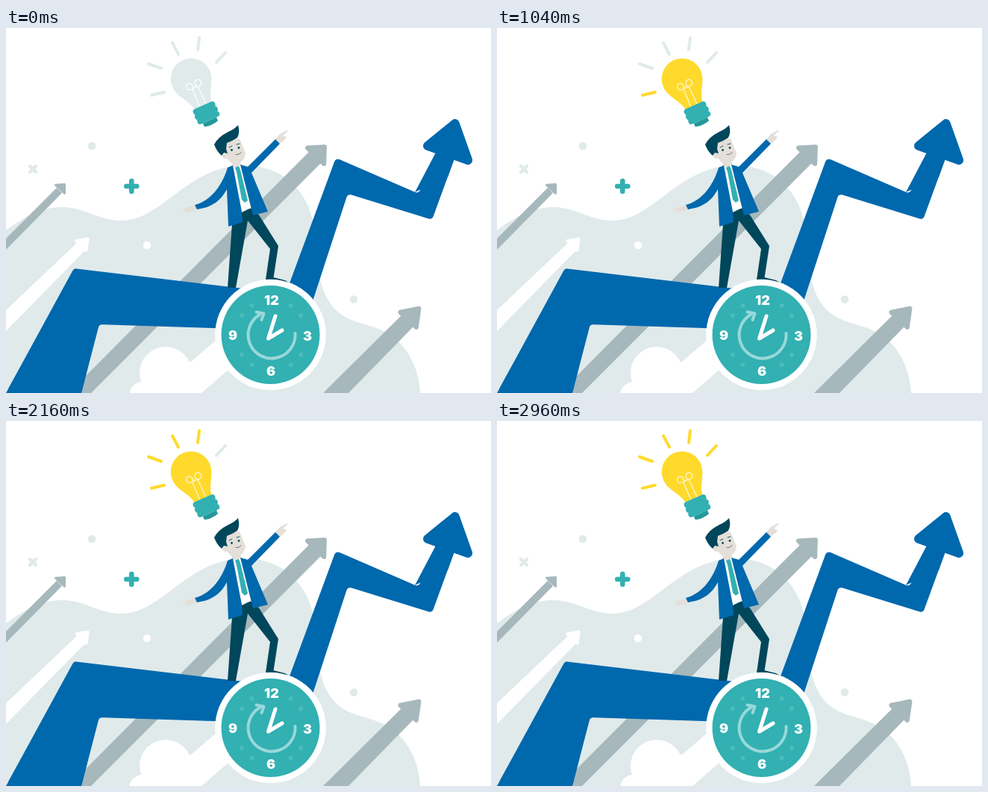
Recreate the animation shown at these times as an HTML page with a canvas. Size 650 by 489 pixels, loop 3000 ms.

```html
<!DOCTYPE html>
<html lang="en">
<head>
<meta charset="utf-8">
<title>Bright idea</title>
<style>
html, body { margin: 0; width: 100%; height: 100%; overflow: hidden; background: #fff; }
canvas { display: block; width: 650px; height: 489px; }
</style>
</head>
<body>
<canvas id="stage" width="650" height="489"></canvas>
<script>
const ctx = document.getElementById('stage').getContext('2d');
const W = 650, H = 489, LOOP = 3000;
const BULB_ON = 600, STEP = 360;
const PALE = '#e0eaea', GRAY = '#a6b8bc', BLUE = '#0068ad', NAVY = '#00475c',
      TEAL = '#32b0b2', YELLOW = '#ffda2c', SKIN = '#e4dfd8', WHITE = '#fff';

const RAYS = [
  [195, 90, 212, 86], [191, 48, 208, 54], [223, 20, 231, 35],
  [259, 13, 257, 29], [294, 33, 282, 46]
];

function shape(d, color) {
  ctx.fillStyle = color;
  ctx.fill(new Path2D(d));
}

function line(d, color, width) {
  ctx.strokeStyle = color;
  ctx.lineWidth = width;
  ctx.lineCap = ctx.lineJoin = 'round';
  ctx.stroke(new Path2D(d));
}

function dot(x, y, r, color) {
  ctx.fillStyle = color;
  ctx.beginPath();
  ctx.arc(x, y, r, 0, Math.PI * 2);
  ctx.fill();
}

// Polygon with softened corners
function poly(points, r, color) {
  const n = points.length, [ax, ay] = points[n - 1], [bx, by] = points[0];
  ctx.beginPath();
  ctx.moveTo((ax + bx) / 2, (ay + by) / 2);
  points.forEach(([x, y], i) => {
    const [nx, ny] = points[(i + 1) % n];
    ctx.arcTo(x, y, nx, ny, r);
  });
  ctx.closePath();
  ctx.fillStyle = color;
  ctx.fill();
}

function cross(x, y, arm, width, turn, color) {
  ctx.save();
  ctx.translate(x, y);
  ctx.rotate(turn);
  line(`M${-arm} 0H${arm}M0 ${-arm}V${arm}`, color, width);
  ctx.restore();
}

function drawBackdrop() {
  shape('M0 271C30 249 50 240 76 240C108 241 126 259 157 258C211 256 244 183 322 184' +
        'C374 185 405 222 412 262C418 300 414 340 436 371C459 402 496 391 526 420' +
        'C544 438 554 463 555 489H0Z', PALE);
  dot(214, 462, 35, WHITE);
  dot(183, 492, 18, WHITE);
  shape('M180 489L196 462L248 447L298 404L330 430L262 489Z', WHITE);

  shape('M0 282L68 214L75 221L0 297Z', GRAY);
  poly([[80, 208], [80, 225], [63, 209]], 1.5, GRAY);
  shape('M0 378L96 287L106 298L0 406Z', WHITE);
  poly([[112, 280], [109, 302], [90, 284]], 2, WHITE);
  shape('M84 489L406 166L422 181L114 489Z', GRAY);
  poly([[430, 156], [429, 189], [397, 158]], 3, GRAY);
  shape('M425 489L531 384L546 400L459 489Z', GRAY);
  poly([[557, 372], [552, 407], [522, 379]], 3, GRAY);

  dot(115, 158, 5.3, PALE);
  dot(189, 291, 5.2, WHITE);
  dot(466, 363.5, 5.3, PALE);
  cross(36, 189, 5.5, 4.6, Math.PI / 4, PALE);
  cross(168.3, 212, 7, 6.6, 0, TEAL);
}

function drawTrend() {
  poly([[0, 489], [91, 322], [318, 349], [374, 358], [442, 174], [553, 222],
        [578, 165], [602, 172], [571, 257], [458, 222], [410, 369],
        [340, 404], [125, 397], [101, 489], [50, 489]], 5, BLUE);
  shape('M0 489L20 453L110 453L101 489Z', BLUE);
  shape('M548 220L578 163L602 172L592 200Z', BLUE);
  poly([[604.5, 118], [629, 187], [553, 160]], 6, BLUE);
}

function drawMan() {
  // legs
  shape('M303 262L317 244L331 241L340 252L365 292L358 338L348 337L354 296L324 258L308 348L297 348Z', NAVY);
  shape('M349 334L358 334L374 338L382 343H348Z', NAVY);
  // hands
  shape('M256 238L246 239L236 243Q236 245 241 244L240 247Q245 248 256 243Z', SKIN);
  shape('M360 150L367 142L377 136.5L377 138.5L371 144L376 146Q375 150 366 155Z', SKIN);
  // shirt and tie
  shape('M302 183L316 183L330 240L316 247Z', WHITE);
  shape('M302 176L313 174L315 183L308 188L303 184Z', SKIN);
  shape('M307 187L312 185L314 190L324 231L320 234L316 230L309 193Z', TEAL);
  // jacket
  shape('M304 184L297 187C291 207 277 231 253 237L256 243C277 240 288 231 296 216' +
        'L298 266L317 260L316 246Z', BLUE);
  shape('M314 183L324 186L361 149L367 155L329 194L351 246L331 251Z', BLUE);
  // head
  shape('M292 158Q300 148 313 148L321 168Q320 176 314 180Q305 185 300 179L293 171Z', SKIN);
  dot(294, 171, 4, SKIN);
  shape('M279 156Q284 146 298 139Q307 135 311 130Q314 140 310 147Q304 151 296 154' +
        'L295 162L297 168L292 167L289 171Q282 165 279 156Z', NAVY);
  dot(302.5, 163.5, 1.4, NAVY);
  dot(312, 160.5, 1.4, NAVY);
  line('M299 160L303 158M309 156L313 155', NAVY, 0.9);
  line('M308 169.5Q313 170 315 166.5', '#6b7478', 1);
}

function drawClock() {
  const cx = 354.5, cy = 411;
  dot(cx, cy, 74.3, WHITE);
  dot(cx, cy, 66, TEAL);
  for (let h = 0; h < 12; h++) {
    if (h % 3 === 0) continue;
    const a = h * Math.PI / 6 + (h % 3 === 1 ? 0.06 : -0.06);
    dot(355.5 + Math.sin(a) * 47.5, 411.5 - Math.cos(a) * 47.5, 3, '#4bbcbd');
  }
  ctx.fillStyle = WHITE;
  ctx.font = '900 18px Inter, "Open Sans", sans-serif';
  ctx.textAlign = 'center';
  ctx.textBaseline = 'alphabetic';
  [['12', 356, 371], ['3', 404, 418.5], ['6', 355, 465.5], ['9', 304, 418]]
    .forEach(([s, x, y]) => ctx.fillText(s, x, y));

  line('M387.5 409A31.5 31.5 0 1 1 340 384', '#99d8d9', 4);
  line('M335.5 380.5L345.5 382.5L342.5 391', '#99d8d9', 4);
  line('M361 386L351.5 416L370 405', WHITE, 5);
}

function drawBulb(t) {
  const lit = t >= BULB_ON;
  RAYS.forEach(([x1, y1, x2, y2], i) =>
    line(`M${x1} ${y1}L${x2} ${y2}`, t >= BULB_ON + STEP * (i + 1) ? YELLOW : PALE, 4));

  ctx.save();
  ctx.translate(248, 68);
  ctx.rotate(-0.42);
  shape('M-27.3 0A27.3 27.3 0 0 1 27.3 0C27 17 13 25 12 43H-12C-13 25 -27 17 -27.3 0Z',
        lit ? YELLOW : PALE);
  line('M-4.5 40L-4 13C-13 15 -12 3 -5.5 4.5C-1 6 -1 12 -4 13H4' +
       'C1 12 1 6 5.5 4.5C12 3 13 15 4 13L4.5 40', lit ? '#fff3bd' : '#f8fbfb', 1.5);
  shape('M-10 61H10V66Q0 69 -10 66Z', '#24989b');
  line('M-12 43H12M-12.5 50H12.5M-12 57H12', TEAL, 8);
  ctx.restore();
}

function frame(now) {
  const t = now % LOOP;
  ctx.fillStyle = WHITE;
  ctx.fillRect(0, 0, W, H);
  drawBackdrop();
  drawTrend();
  drawMan();
  drawClock();
  drawBulb(t);
  requestAnimationFrame(now => frame(now - start));
}

const start = performance.now();
frame(0);
</script>
</body>
</html>
```
